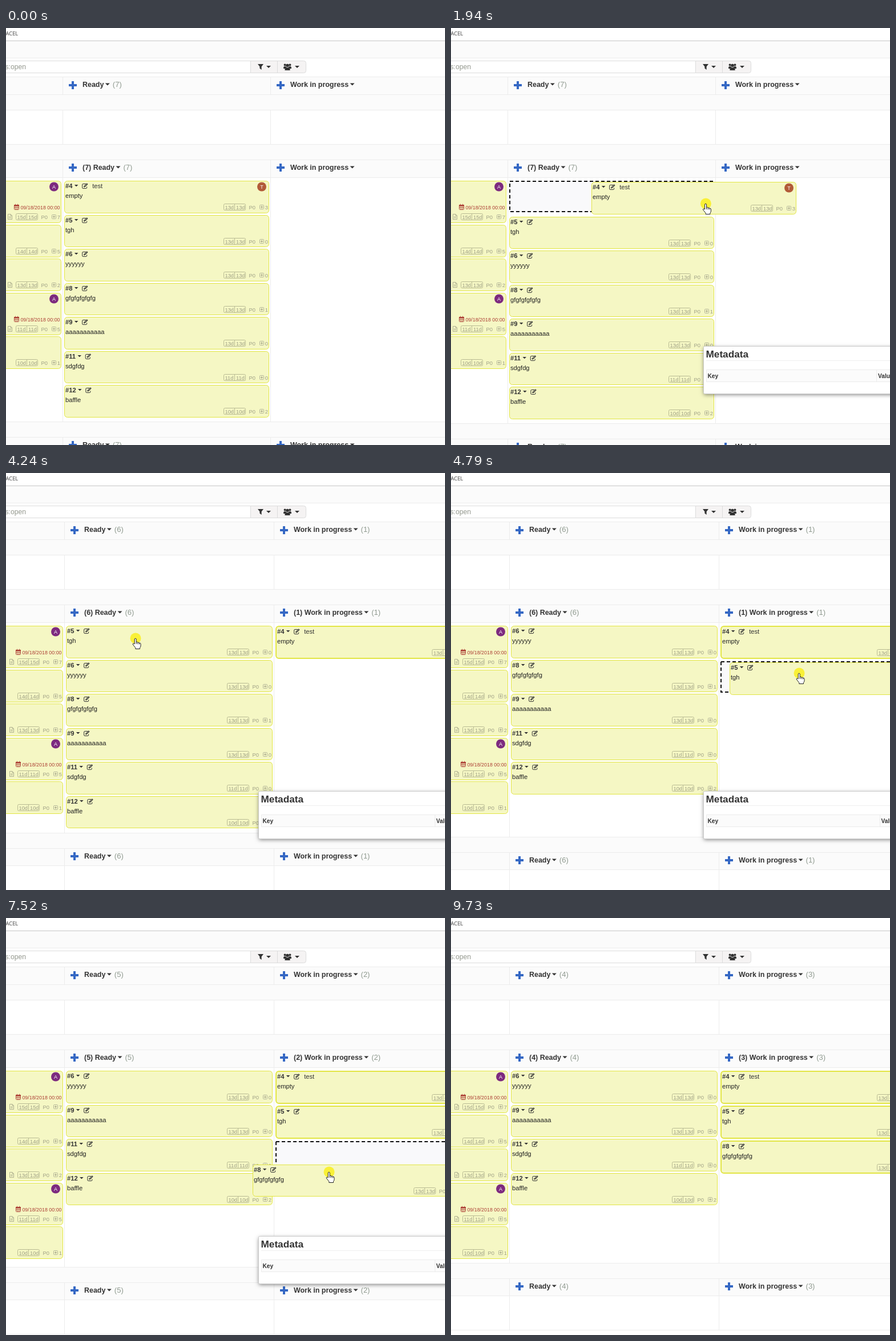
An HTML page with a canvas for the animation above (9.93 s loop, 769 by 729 pixels).

```html
<!DOCTYPE html>
<html lang="en">
<head>
<meta charset="utf-8">
<title>Board</title>
<style>
html, body { margin: 0; width: 100%; height: 100%; overflow: hidden; background: #fff }
canvas { display: block }
</style>
</head>
<body>
<canvas id="stage" width="769" height="729"></canvas>
<script>
const W = 769, LOOP = 9930;
const c = document.getElementById('stage').getContext('2d');
const SANS = '"Liberation Sans", Arial, sans-serif';
const DARK = '#333', LINE = '#ececec', BAND = '#fbfbfb', META = '#9fa085', RED = '#ad4036';
const EDGE = '#e2e544', PAPER = '#f5f7c4';

// [first step, last step, number of steps]
const SPANS = [
  [0, 0, 1], [410, 1190, 8], [1610, 1610, 1], [1850, 2160, 4], [2370, 2370, 1], [2590, 3470, 9],
  [3590, 3590, 1], [4240, 5230, 10], [5340, 6090, 8], [6550, 7520, 10], [7640, 7640, 1],
  [7840, 7960, 2], [8100, 8390, 4], [8600, 9280, 7], [9730, 9730, 1]
];

// pointer path: [time, x, y]
const PATH = [
  [410, 540, 610], [521, 470, 572], [633, 448, 551], [1190, 282, 303], [1850, 322, 304],
  [1953, 446, 307], [2057, 560, 315], [2160, 612, 320], [2480, 612, 320], [2810, 490, 322],
  [3040, 369, 310], [3470, 227, 289], [4240, 227, 289], [4350, 250, 296], [4570, 470, 330],
  [4790, 610, 350], [5010, 612, 350], [5450, 470, 338], [6090, 234, 308], [6442, 234, 308],
  [6766, 239, 340], [6873, 239, 340], [7520, 566, 444], [8490, 566, 444], [9167, 705, 672]
];

const MOVES = [
  { id: 4, press: 1610, drag: 1850, drop: 2370, done: 3590, grab: [302, 305] },
  { id: 5, press: 4240, drag: 4350, drop: 4900, done: 5970, grab: [227, 286] },
  { id: 8, press: 6860, drag: 6970, drop: 7640, done: 8820, grab: [239, 340] }
];

const task = (id, text, days, num, extra) => ({ id, text, days, num, ...extra });
const TASKS = [
  task(4, 'empty', '13d', 3, { title: 'test', avatar: 'T' }),
  task(5, 'tgh', '13d', 0), task(6, 'yyyyyy', '13d', 0), task(8, 'gfgfgfgfgfg', '13d', 1),
  task(9, 'aaaaaaaaaaa', '13d', 0), task(11, 'sdgfdg', '11d', 0), task(12, 'baffle', '10d', 2)
];
const BACKLOG = [
  { y: 267, h: 73, days: '15d', num: 7, doc: 1, avatar: 'A', date: 1 },
  { y: 344, h: 56, days: '14d', num: 5 },
  { y: 403, h: 56, days: '13d', num: 2, doc: 1 },
  { y: 463, h: 73, days: '11d', num: 5, doc: 1, avatar: 'A', date: 1 },
  { y: 539, h: 56, days: '10d', num: 1 }
];

function snap(t) {
  const [a, b, n] = SPANS.findLast(s => s[0] <= t);
  if (n === 1) return a;
  const step = (b - a) / (n - 1);
  return a + step * Math.min(n - 1, Math.floor((t - a + 15) / step));
}

function pointer(t) {
  const i = PATH.findIndex(p => p[0] > t);
  if (i < 0) return PATH.at(-1).slice(1);
  if (!i) return PATH[0].slice(1);
  const [t0, x0, y0] = PATH[i - 1], [t1, x1, y1] = PATH[i];
  const k = (t - t0) / (t1 - t0);
  return [x0 + (x1 - x0) * k, y0 + (y1 - y0) * k];
}

function text(s, x, y, size, color = DARK, weight = '', align = 'left', family = SANS) {
  c.font = `${weight} ${size}px ${family}`;
  c.fillStyle = color;
  c.textAlign = align;
  c.fillText(s, x, y);
  return c.measureText(s).width;
}

function rect(x, y, w, h, color) {
  c.fillStyle = color;
  c.fillRect(x, y, w, h);
}

function box(x, y, w, h, r, stroke, fill, lw = 1) {
  c.beginPath();
  c.roundRect(x + lw / 2, y + lw / 2, w - lw, h - lw, r);
  if (fill) { c.fillStyle = fill; c.fill(); }
  c.lineWidth = lw;
  c.strokeStyle = stroke;
  c.stroke();
}

function disc(x, y, r, color) {
  c.fillStyle = color;
  c.beginPath();
  c.arc(x, y, r, 0, 7);
  c.fill();
}

function shape(d, x, y, fill, stroke, lw = 1) {
  const p = new Path2D(d);
  c.save();
  c.translate(x, y);
  if (fill) { c.fillStyle = fill; c.fill(p); }
  if (stroke) { c.strokeStyle = stroke; c.lineWidth = lw; c.stroke(p); }
  c.restore();
}

const caret = (x, y, r = 4) => shape(`M${-r}-2H${r}L0 ${r - 2}Z`, x, y, DARK);

function editIcon(x, y) {
  shape('M2-3.5H-3Q-4.5-3.5-4.5-2V3Q-4.5 4.5-3 4.5H2Q3.5 4.5 3.5 3V1.5', x, y, null, DARK);
  shape('M-2 2.5L-1.7.3 3.5-4.8 5.4-3 .2 2.2Z', x, y, DARK);
  shape('M-.8 1L3.6-3.2', x, y, null, PAPER, .7);
}

function avatar(x, y, letter) {
  disc(x, y, 8, letter === 'T' ? '#b25b38' : '#7d2a7f');
  text(letter, x, y + 3.2, 9, '#fff', '', 'center');
}

// footer is anchored to the right edge r and the middle line y
function footer(r, y, k) {
  const age = k.age || k.days, wide = k.age ? 47 : 39;
  const left = Math.round(r - 41.5 - wide), mid = left + 19;
  box(left, y - 6, wide, 12, 2, '#b9bb93');
  rect(mid, y - 6, 1, 12, '#b9bb93');
  text(k.days, left + 2.5, y + 3.5, 9.3, META);
  text(age, mid + 3, y + 3.5, 9.3, META);
  text('P0', r - 35.5, y + 3.5, 9.3, META);
  box(r - 17, y - 4, 8, 8, 1, '#b3b598');
  rect(r - 15, y - .5, 4, 1, META);
  rect(r - 13.5, y - 2, 1, 4, META);
  text(k.num, r - 2, y + 3.5, 9.5, META, '', 'right');
  if (k.doc) shape('M-3.5-4.5H1L3.5-2V4.5H-3.5ZM1-4.5V-2H3.5M-2 0H2M-2 2H2', r - 90, y, null, META, .8);
}

function card(x, top, w, k, border = 1) {
  x = Math.round(x);
  const y = Math.round(top), e = border - 1;
  box(x, y, w, Math.round(top + 56.5) - y + e, 5, EDGE, PAPER, border);
  const tx = x + 2 + e, ty = y + 13 + e;
  const cx = tx + text('#' + k.id, tx, ty, 11.2, DARK, 'bold') + 6.7;
  caret(cx, ty - 4, 3.3);
  editIcon(cx + 15, ty - 4);
  if (k.title) text(k.title, cx + 28, ty, 11.2);
  text(k.text, tx, ty + 16.5, 11.2, '#222');
  footer(x + w, y + 46 + e, k);
  if (k.avatar) avatar(x + w - 13, y + 10.5 + e, k.avatar);
}

function backlogCard(k, right) {
  box(-20, k.y, 20 + right, k.h + 1, 5, EDGE, PAPER);
  footer(right, k.y + k.h - 10, k);
  if (k.avatar) avatar(right - 13, k.y + 10.5, k.avatar);
  if (k.date) {
    const y = k.y + 46;
    text('09/18/2018 00:00', right - 2.5, y + 3.5, 8.9, RED, '', 'right');
    box(right - 83, y - 4, 9, 9, 1, RED);
    rect(right - 83, y - 4, 9, 2.5, RED);
    shape('M-1.5-2V4M1.5-2V4M-4 1H4M-2-5.5V-3M2-5.5V-3', right - 78.5, y, null, RED, .8);
  }
}

function heading(x, y, label, count, prefixed) {
  const py = Math.floor(y) + 15, base = Math.round(y + 18);
  rect(x + 11, py - 2, 14, 4, '#3568c4');
  rect(x + 16, py - 7, 4, 14, '#3568c4');
  const s = (prefixed && count ? `(${count}) ` : '') + label;
  const cx = x + 35 + text(s, x + 35, base, 12.45, DARK, 'bold') + 6.5;
  caret(cx, base - 4.5);
  if (count) text(`(${count})`, cx + 9, base, 13, '#8f9a8f');
}

function toolbar() {
  text('ACEL', -.5, 12.5, 9.4, '#444', '', 'left', '"Open Sans", sans-serif');
  rect(0, 22, W, 1, '#c4c4c4');
  rect(0, 24, W, 28, BAND);
  rect(0, 52, W, 1, LINE);
  box(-9, 57, 438, 22, 0, '#dcdcdc', '#fff');
  text('s:open', 35, 72, 12.2, '#95998f', '', 'right');
  box(428, 57, 98, 22, [0, 4, 4, 0], '#dcdcdc', '#f5f3f3');
  rect(475, 57, 1, 22, '#dcdcdc');
  shape('M-5-5H5L1.6-.5V5L-1.6 2.5V-.5Z', 446, 68, DARK);
  caret(460, 68);
  for (const s of [-1, 1]) {
    disc(493 + s * 4.4, 64.5, 2, DARK);
    shape('M-2.5 3V.5Q-2.5-1 0-1T2.5.5V3Z', 493 + s * 4.4, 68, DARK);
  }
  disc(493, 65.5, 2.8, DARK);
  shape('M-4.5 5V3Q-4.5 0-2 0H2Q4.5 0 4.5 3V5Z', 493, 69, DARK);
  caret(510, 68);
}

function band(y, h) {
  rect(0, y, W, h, BAND);
  rect(0, y, W, 1, LINE);
  rect(0, y + h, W, 1, LINE);
}

function popup(valueX) {
  c.save();
  c.shadowColor = 'rgba(0,0,0,.5)';
  c.shadowBlur = 7;
  c.shadowOffsetY = 2;
  rect(443, 557, 400, 82, '#fff');
  c.restore();
  box(442, 556, 400, 84, 2, '#ccc', '#fff');
  text('Metadata', 446.5, 576, 17.2, DARK, 'bold');
  rect(447, 581, 340, 1, '#eee');
  box(447, 597, 400, 22, 0, '#ebebeb', '#fbfbfb');
  rect(Math.round(valueX - 3), 597, 1, 22, '#ebebeb');
  text('Key', 449.5, 612, 10.2, DARK, 'bold');
  text('Value', valueX, 612, 10.2, DARK, 'bold');
}

function spinner(x, y, t) {
  for (let i = 0; i < 8; i++) {
    const a = t / 2000 * 2 * Math.PI + i * Math.PI / 4;
    disc(x + 9 * Math.cos(a), y + 9 * Math.sin(a), 1.4 + i * .14, '#999');
  }
}

function slot(x, y, w) {
  rect(x, y, w, 55, '#f9f9fb');
  c.setLineDash([6, 4]);
  box(x, y, w, 55, 0, '#111', null, 2);
  c.setLineDash([]);
}

const hand = (x, y) => shape('M-1.8 9V1Q-1.8-.8-.3-.8T1.2 1V5.5Q3.7 4.8 3.9 6.3 6.2 5.7 6.5 7.2 9 6.8 9 9V12Q9 14 7.5 15.5V17.5H-.2V15.5L-4.6 10Q-5.4 8-3.7 8Z' +
  'M1.2 5.5V9M3.9 6.3V9.3M6.5 7.2V9.5', x, y, '#fff', '#222');

function draw(t) {
  const moved = MOVES.filter(m => t >= m.done);
  const move = MOVES.find(m => t >= m.drag && t < m.done);
  const dragging = move && t < move.drop;
  const n = moved.length, fresh = n > 0;
  const x2 = fresh ? 102 : 99, x3 = fresh ? 469 : 463, cw = fresh ? 362 : 359;
  const [px, py] = pointer(t);
  const over = move && (!dragging || px > x3);
  const ready = 7 - n;
  const bottom = Math.round(Math.max(603, 271.5 + 59.5 * ready)) + (dragging ? (over ? 7 : 3) : 0);

  rect(0, 0, W, 729, '#fff');
  toolbar();
  band(85, 31);
  band(116, 27);
  band(203, 27);
  band(230, 31);
  band(bottom, 27);
  band(bottom + 27, 30);
  rect(0, bottom + 117, W, 1, LINE);
  for (const x of [x2, x3])
    for (const [y, h] of [[85, 31], [143, 60], [230, bottom - 230], [bottom + 27, 90]]) rect(x, y, 1, h, LINE);
  for (const y of [85, 229.5, bottom + 26.5]) {
    heading(x2, y, 'Ready', ready, y === 229.5);
    heading(x3, y, 'Work in progress', n, y === 229.5);
  }
  BACKLOG.forEach(k => backlogCard(k, fresh ? 100 : 97));

  const cx2 = x2 + 3, cx3 = x3 + 3;
  let y = 267;
  let held, home;
  for (const k of TASKS) {
    if (moved.some(m => m.id === k.id)) continue;
    if (move && move.id === k.id) {
      held = k;
      home = y;
      if (!over) { slot(cx2, Math.round(y), cw); y += 62.5; }
      continue;
    }
    card(cx2, y, cw, k);
    y += 59.5;
  }
  moved.forEach((m, i) => {
    const k = TASKS.find(k => k.id === m.id);
    card(cx3, 267 + 61 * i, cw, { ...k, age: '<15m' }, 2);
  });
  const free = n ? 268 + 61 * n : 267;
  if (dragging && over) slot(cx3, free, cw);
  if (move && !dragging) {
    c.globalAlpha = .22;
    card(cx3, free, cw, held);
    c.globalAlpha = 1;
    spinner(cx3 + cw / 2, free + 14, t);
  }
  if (t >= 600 && t < 9730) popup(fresh ? 753.5 : 748);
  if (dragging) card(cx2 + px - move.grab[0], home + py - move.grab[1], cw, held);
  if (MOVES.some(m => t >= m.press && t < m.drop)) disc(px, py, 9.5, 'rgba(250,238,20,.8)');
  if (t >= 410 && t < 9270) hand(px, py + 1);
}

function frame(now) {
  draw(snap(now % LOOP));
  requestAnimationFrame(frame);
}
requestAnimationFrame(frame);
</script>
</body>
</html>
```
